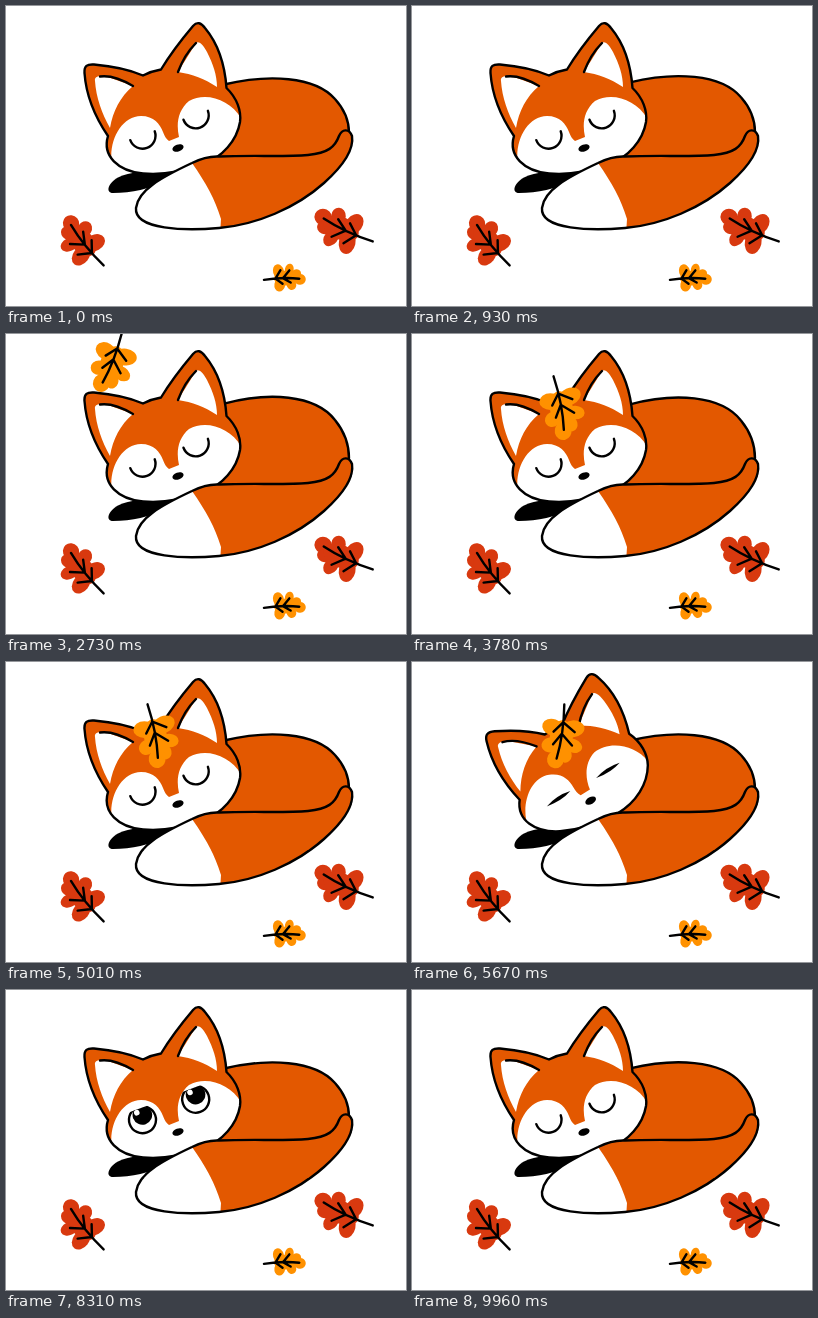
An HTML page for the animation above (9990 ms loop, 400x300 px).

```html
<!DOCTYPE html>
<html lang="en">
<head>
<meta charset="utf-8">
<title>Sleeping fox</title>
<style>
html, body { margin: 0; width: 100%; height: 100%; overflow: hidden; background: #fff; }
svg { display: block; width: 100%; height: 100%; }
.line { fill: none; stroke: #000; stroke-width: 2.4; stroke-linecap: round; stroke-linejoin: round; vector-effect: non-scaling-stroke; }
.fur { fill: #e35800; }
.white { fill: #fff; }
</style>
</head>
<body>
<svg viewBox="0 0 400 300">
  <defs>
    <path id="headShape" class="shape" vector-effect="non-scaling-stroke" d="M102 130C89 111 80 88 78.500 67C78 60 81 58 88 58.500C105 60 122 63 137 69.500C143 66.500 149 64.500 155 63.500C165 47 176 33 187 20C191 15.500 195 16.500 199 22C214 40 219 61 220.500 82C231 92 235.500 105 234 116C231 134 217 151 196 159C176 166 155 169 137 167.500C112 165 96 150 102 130Z"/>
    <path id="tailShape" vector-effect="non-scaling-stroke" d="M130 202C132 184 156 171 186 157C196 152 204 150 213 150.500C246 149 278 151 302 149C322 147 329 141 333 130C336 123 343 122 346 130C348 143 337 160 318 177C290 202 250 219 213 222C180 225 128 224 130 202Z"/>
    <clipPath id="headClip"><use href="#headShape"/></clipPath>
    <clipPath id="tailClip"><use href="#tailShape"/></clipPath>
    <clipPath id="eyeClip"><circle r="12.800"/></clipPath>
    <clipPath id="lidClip"><rect id="lid" x="-18" y="-16" width="36" height="40"/></clipPath>
    <clipPath id="scene"><rect x="41" width="318" height="300"/></clipPath>
    <g id="lobes">
      <ellipse cx="3" cy="-19" rx="8" ry="8.500"/>
      <ellipse cx="-6" cy="-14" rx="6" ry="7"/>
      <ellipse cx="-12" cy="-4" rx="9" ry="6.500" transform="rotate(15 -12 -4)"/>
      <ellipse cx="10" cy="-6" rx="8" ry="7" transform="rotate(-20 10 -6)"/>
      <ellipse cx="-10" cy="12" rx="11" ry="8" transform="rotate(-12 -10 12)"/>
      <ellipse cx="9" cy="11" rx="10.500" ry="8" transform="rotate(12 9 11)"/>
      <ellipse cy="1" rx="11" ry="18"/>
    </g>
    <path id="veins" vector-effect="non-scaling-stroke" d="M2 -18Q-2 6 1 34M-11 -4L0 6L7 -5M-12 9L0 17L8 7"/>
  </defs>

  <g id="ground"></g>

  <g id="body">
    <path class="fur" d="M200 90L222 77.500C262 68 309 70 329 93C340 105 343 116 343 127L332 150H190Z"/>
    <path class="line" d="M218 78.500C262 68 309 70 329 93C340 105 343 116 343 127"/>
  </g>
  <path d="M166 164C142 164 123 166 112 171.500C102 177 99 187 107 187C126 187 144 183 158 175Z"/>

  <g id="head">
    <use href="#headShape" class="fur"/>
    <g class="white">
      <path clip-path="url(#headClip)" d="M106 158C102 136 115 110 135 110C148 110 154 118 157 126C158.500 130 160 133 163 135L173 131C170 118 172 104 183 95C200 85 226 94 236 114L235 180H110Z"/>
      <path d="M89 75C88 70 94 69 102 71L127 80C114 91 107 105 104 122C96 108 90 91 89 75Z"/>
      <path d="M190 37C193 34 198 40 201 46C207 58 211 69 211 81C199 73 186 68 172 66Z"/>
    </g>
    <path class="line" d="M94 70.500C105 69 117 74 127 80M190 37C182 45 176 55 172 66"/>
    <use href="#headShape" class="line"/>
    <ellipse cx="172" cy="142" rx="5.800" ry="3.500" transform="rotate(-20 172 142)"/>
    <g id="eyes"></g>
  </g>

  <use href="#tailShape" class="fur"/>
  <path class="white" clip-path="url(#tailClip)" d="M120 150H182L186 157C200 177 209 193 215 213L214 230H120Z"/>
  <use href="#tailShape" class="line"/>

  <g clip-path="url(#scene)"><g id="falling"></g></g>
</svg>
<script>
const LOOP = 9990, BREATH = 1110;
const $ = id => document.getElementById(id);

const leaf = color =>
  `<use href="#lobes" fill="${color}"/><use href="#veins" class="line"/>`;
const place = (x, y, turn, size = 1) =>
  `translate(${x} ${y}) rotate(${turn}) scale(${size})`;

$('ground').innerHTML = [
  ['#d8390f', 75, 234, -40, 1],
  ['#d8390f', 334, 222, -66, 1.04],
  ['#ff9100', 281, 272, 87, 0.68]
].map(([color, ...at]) => `<g transform="${place(...at)}">${leaf(color)}</g>`).join('');
$('falling').innerHTML = leaf('#ff9100');

$('eyes').innerHTML = [[136.5, 129.7], [189.7, 109.3]].map(([x, y]) => `
  <g transform="translate(${x} ${y}) rotate(-20)">
    <path class="shut line" d="M-13 0A13 13 0 0 0 13 0"/>
    <path class="squint" d="M-12 7.500Q2 2.500 16 5.500Q4 10 -12 7.500Z"/>
    <g class="open" clip-path="url(#lidClip)">
      <circle class="white" r="13.5"/>
      <g clip-path="url(#eyeClip)">
        <circle cx="1.5" cy="-4.5" r="9.8"/>
        <circle class="white" cx="-3" cy="-8.5" r="2.8"/>
      </g>
      <circle class="line" r="13.5"/>
    </g>
  </g>`).join('');

// Each row: time, then values.
const headTrack = [[5100, 0], [5400, -9], [6250, -9], [6550, 0]];
const lidTrack = [[6350, 14], [6550, 0], [8130, 0], [8310, 4.5], [8580, 22]];
const leafTrack = [
  [1200, 28, -38, -75], [1740, 57, 12, -114], [2300, 75, 20, -150],
  [3090, 128, 40, -168], [3650, 150, 77, -192], [5150, 150, 77, -192],
  [5670, 149, 78, -173], [6050, 146, 79, -180], [6600, 0, 72, -320]
];

const ease = p => p * p * (3 - 2 * p);
function sample(track, t) {
  if (t <= track[0][0]) return track[0].slice(1);
  const i = track.findIndex(row => row[0] > t);
  if (i < 0) return track.at(-1).slice(1);
  const a = track[i - 1], b = track[i];
  const p = ease((t - a[0]) / (b[0] - a[0]));
  return a.slice(1).map((v, k) => v + (b[k + 1] - v) * p);
}

function show(name, on) {
  for (const el of document.querySelectorAll('.' + name)) el.style.display = on ? '' : 'none';
}

function draw(t) {
  const asleep = t < BREATH * 4 || t > BREATH * 8;
  const breath = asleep ? (1 - Math.cos(t / BREATH * 2 * Math.PI)) / 2 : 0;
  $('body').setAttribute('transform', `translate(0 150) scale(1 ${1 + 0.125 * breath}) translate(0 -150)`);
  $('head').setAttribute('transform', `rotate(${sample(headTrack, t)} 154 98)`);
  $('falling').setAttribute('transform', place(...sample(leafTrack, t), 1.05));
  $('lid').setAttribute('y', sample(lidTrack, t)[0] - 16);

  const squint = t >= 5200 && t < 6400, open = t >= 6400 && t < 8560;
  show('squint', squint);
  show('open', open);
  show('shut', !squint && !open);
}

const start = performance.now();
function tick() {
  draw((performance.now() - start) % LOOP);
  requestAnimationFrame(tick);
}
tick();
</script>
</body>
</html>
```
